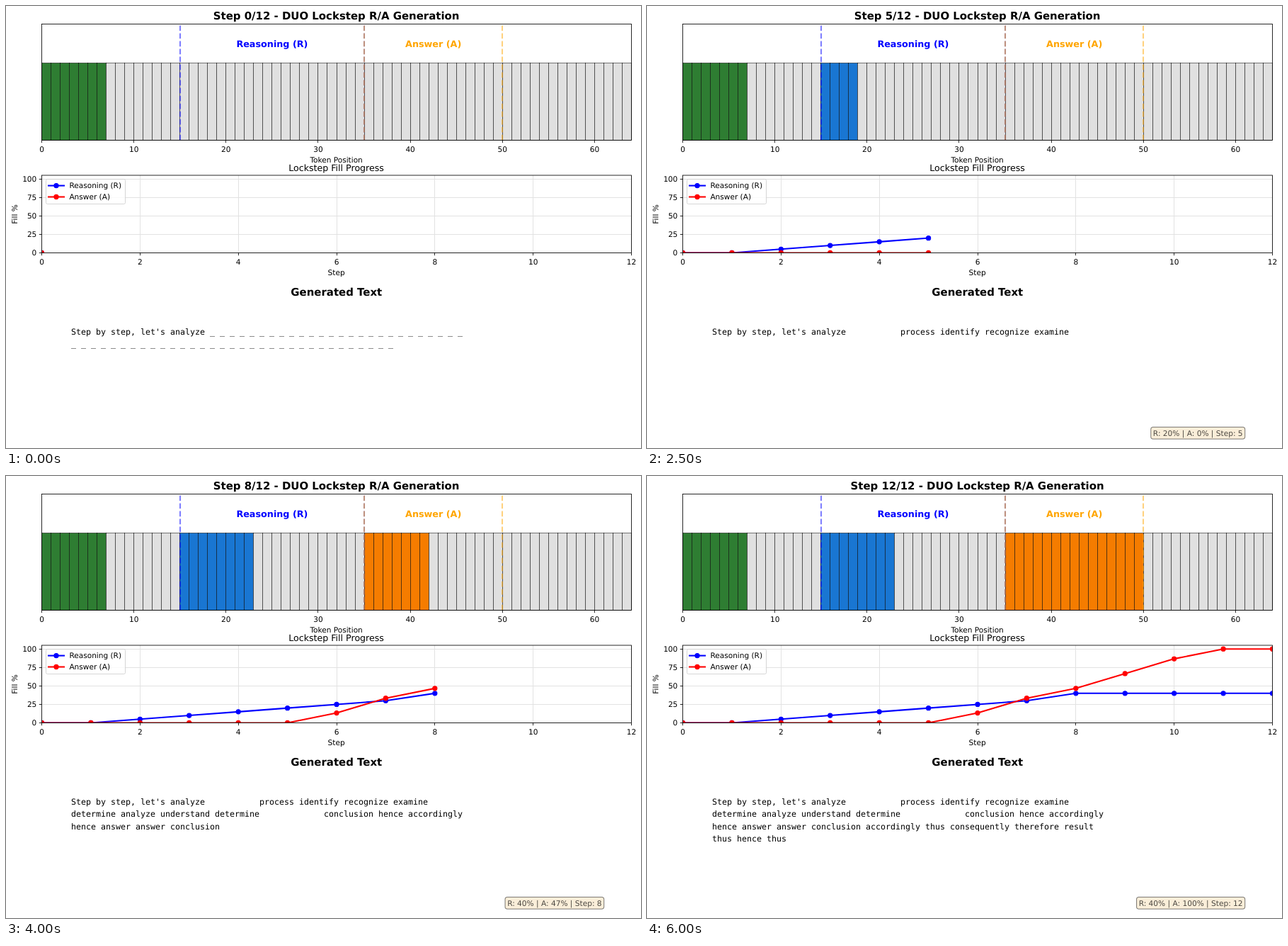
An HTML page for the animation above (6.5 s loop, 897 by 624 pixels).

```html
<!DOCTYPE html>
<html lang="en">
<head>
<meta charset="utf-8">
<title>Lockstep Generation</title>
<style>
  html, body { margin: 0; width: 100%; height: 100%; overflow: hidden; background: #fff; }
  svg { display: block; }
  text { font: 10.55px "DejaVu Sans", sans-serif; text-rendering: geometricPrecision; white-space: pre; }
  .title { font-size: 14.95px; font-weight: bold; }
  .label { font-size: 12.75px; font-weight: bold; }
  .sub { font-size: 12.6px; }
  .mono { font-family: "DejaVu Sans Mono", monospace; font-size: 11.63px; }
  .mid { text-anchor: middle; }
  .end { text-anchor: end; }
</style>
</head>
<body>
<svg id="stage" width="897" height="624" viewBox="0 0 897 624">
  <defs><clipPath id="plot"><rect x="50.5" y="239" width="833" height="109.5"/></clipPath></defs>
</svg>
<script>
const STEP_MS = 500, STEPS = 12, TOKENS = 64, PROMPT = 7;
const R_START = 15, R_SIZE = 20, A_START = 35, A_SIZE = 15;
const LEFT = 50.5, RIGHT = 883.5, WIDTH = RIGHT - LEFT;
const rCount = [0, 0, 1, 2, 3, 4, 5, 6, 8, 8, 8, 8, 8];
const aCount = [0, 0, 0, 0, 0, 0, 2, 5, 7, 10, 13, 15, 15];
const prompt = "Step by step, let's analyze";
const rWords = "process identify recognize examine determine analyze understand determine".split(" ");
const aWords = ("conclusion hence accordingly hence answer answer conclusion accordingly " +
  "thus consequently therefore result thus hence thus").split(" ");

const stage = document.getElementById("stage");

function add(tag, attrs, parent = stage) {
  const el = document.createElementNS("http://www.w3.org/2000/svg", tag);
  for (const k in attrs) el.setAttribute(k, attrs[k]);
  parent.appendChild(el);
  return el;
}
function label(x, y, str, cls = "", attrs = {}) {
  const el = add("text", { x, y, class: cls, ...attrs });
  el.textContent = str;
  return el;
}
const line = (x1, y1, x2, y2, attrs, parent) => add("line", { x1, y1, x2, y2, ...attrs }, parent);
const snap = v => Math.floor(v) + 0.5;
const tokenX = i => LEFT + i * WIDTH / TOKENS;
const stepX = s => LEFT + s * WIDTH / STEPS;
const fillY = p => 348.5 - p * 109.5 / 105;

const ink = { stroke: "#000", "stroke-width": 0.84 };
const frame = (y, h) => add("rect", { x: LEFT, y, width: WIDTH, height: h, fill: "none", ...ink });
function xTick(x, y, str) {
  line(snap(x), y, snap(x), y + 3.7, ink);
  label(x, y + 16.5, str, "mid");
}

// Token strip
const cells = Array.from({ length: TOKENS }, (_, i) => {
  const x = snap(tokenX(i));
  return add("rect", {
    x, y: 80.5, width: snap(tokenX(i + 1)) - x, height: 109,
    stroke: "#000", "stroke-width": 0.52
  });
});
for (const [i, color] of [[15, "blue"], [35, "blue"], [35, "orange"], [50, "orange"]]) {
  const x = Math.round(tokenX(i));
  line(x, 189.5, x, 25.5, {
    stroke: color, "stroke-width": 2.08, "stroke-opacity": 0.5, "stroke-dasharray": "7.7 3.33"
  });
}
frame(25.5, 164);
for (let i = 0; i <= 60; i += 10) xTick(tokenX(i), 189.5, i);
label(tokenX(25), 58.3, "Reasoning (R)", "label mid", { fill: "blue" });
label(tokenX(42.5), 58.3, "Answer (A)", "label mid", { fill: "orange" });
label(466.6, 221.2, "Token Position", "mid");
const title = label(466.6, 19.3, "", "title mid");

// Progress chart
const grid = { stroke: "#e2e2e2", "stroke-width": 1 };
for (let s = 0; s <= STEPS; s += 2) line(snap(stepX(s)), 239, snap(stepX(s)), 348.5, grid);
for (let p = 0; p <= 100; p += 25) line(LEFT, snap(fillY(p)), RIGHT, snap(fillY(p)), grid);
const plot = add("g", { "clip-path": "url(#plot)" });

function dot(x, y, color, parent) {
  return add("circle", { cx: x, cy: y, r: 3.12, fill: color, stroke: color, "stroke-width": 1.04 }, parent);
}
function makeSeries(color, counts, size) {
  const pts = counts.map((n, s) => [stepX(s), fillY(n / size * 100)]);
  const path = add("polyline", {
    fill: "none", stroke: color, "stroke-width": 2.08,
    "stroke-linejoin": "round", "stroke-linecap": "square"
  }, plot);
  const dots = pts.map(([x, y]) => dot(x, y, color, plot));
  return step => {
    path.setAttribute("points", pts.slice(0, step + 1).join(" "));
    dots.forEach((d, i) => d.setAttribute("visibility", i <= step ? "visible" : "hidden"));
  };
}
const series = [makeSeries("blue", rCount, R_SIZE), makeSeries("red", aCount, A_SIZE)];

frame(239, 109.5);
for (let s = 0; s <= STEPS; s += 2) xTick(stepX(s), 348.5, s);
for (let p = 0; p <= 100; p += 25) {
  const y = snap(fillY(p));
  line(46.8, y, LEFT, y, ink);
  label(43.3, y + 3.9, p, "end");
}
label(466.6, 232.5, "Lockstep Fill Progress", "sub mid");
label(466.6, 379.6, "Step", "mid");
label(0, 0, "Fill %", "mid", { transform: "translate(15.8 294) rotate(-90)" });

add("rect", {
  x: 56.5, y: 244.5, width: 112, height: 35, rx: 2,
  fill: "#fff", "fill-opacity": 0.8, stroke: "#ccc", "stroke-opacity": 0.8
});
[["blue", "Reasoning (R)"], ["red", "Answer (A)"]].forEach(([color, name], i) => {
  const y = 253.6 + i * 15.9;
  line(60, y, 82, y, { stroke: color, "stroke-width": 2.08, "stroke-linecap": "square" });
  dot(71, y, color);
  label(89.4, y + 3.8, name);
});

// Generated text
label(466.8, 408.6, "Generated Text", "title mid");
const rows = [0, 1, 2, 3].map(i => label(92, 464 + i * 17.3, "", "mono"));
const badge = add("rect", {
  y: 594.5, height: 16.8, rx: 3.2,
  fill: "wheat", "fill-opacity": 0.5, stroke: "#000", "stroke-opacity": 0.5, "stroke-width": 1.04
});
const status = label(841.6, 606.6, "", "end", { "fill-opacity": 0.7, style: "font-size:10.6px" });

function compose(step) {
  if (!step) return prompt + " _".repeat(59);
  const r = rCount[step], a = aCount[step];
  let str = prompt;
  if (r) str += " ".repeat(11) + rWords.slice(0, r).join(" ");
  if (a) str += " ".repeat(21 - r) + aWords.slice(0, a).join(" ");
  return str;
}
function wrap(str, limit = 80) {
  const out = [""];
  for (const [, gap, word] of str.matchAll(/(\s*)(\S+)/g)) {
    const last = out.length - 1;
    if (out[last].length + gap.length + word.length <= limit) out[last] += gap + word;
    else out.push(word);
  }
  return out;
}
function cellColor(i, step) {
  if (i < PROMPT) return "#2e7d32";
  if (i >= R_START && i < R_START + rCount[step]) return "#1976d2";
  if (i >= A_START && i < A_START + aCount[step]) return "#f57c00";
  return "#e0e0e0";
}

function draw(step) {
  title.textContent = `Step ${step}/${STEPS} - DUO Lockstep R/A Generation`;
  cells.forEach((c, i) => c.setAttribute("fill", cellColor(i, step)));
  series.forEach(show => show(step));
  const lines = wrap(compose(step));
  rows.forEach((row, i) => { row.textContent = lines[i] || ""; });

  const pct = (n, size) => Math.round(n / size * 100);
  status.textContent = step
    ? `R: ${pct(rCount[step], R_SIZE)}% | A: ${pct(aCount[step], A_SIZE)}% | Step: ${step}` : "";
  badge.setAttribute("visibility", step ? "visible" : "hidden");
  const w = step ? status.getComputedTextLength() + 6.2 : 0;
  badge.setAttribute("x", 844.7 - w);
  badge.setAttribute("width", w);
}

let shown = -1;
const start = performance.now();
function tick() {
  const t = Math.max(0, performance.now() - start);
  const step = Math.floor(t / STEP_MS) % (STEPS + 1);
  if (step !== shown) draw(shown = step);
  requestAnimationFrame(tick);
}
tick();
</script>
</body>
</html>
```
